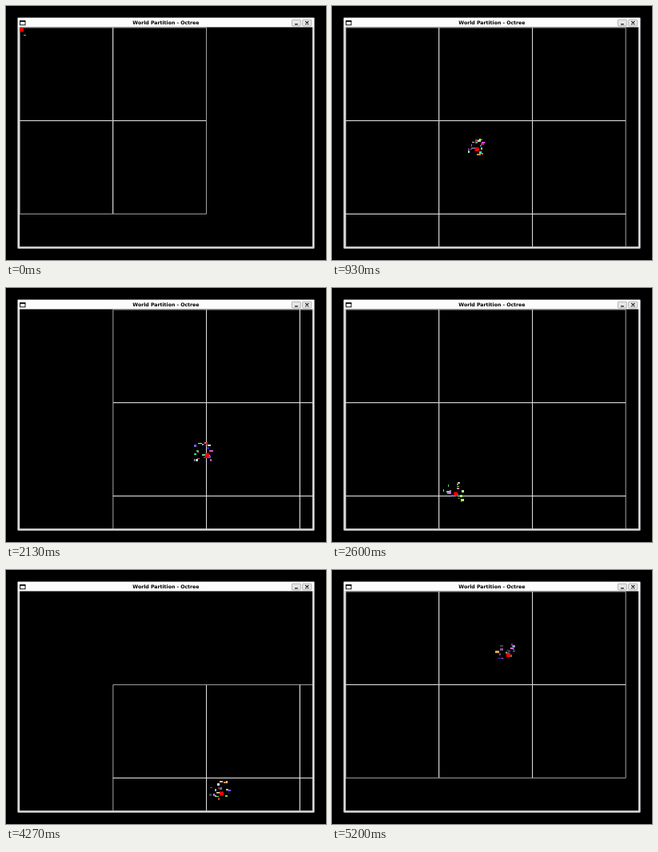
An HTML page with a canvas for the animation above (5.27 s loop, 400 by 318 pixels).

```html
<!DOCTYPE html>
<html lang="en">
<head>
<meta charset="utf-8">
<title>World Partition - Octree</title>
<style>
  html, body { margin: 0; width: 100%; height: 100%; overflow: hidden; background: #000; }
  svg, canvas { position: absolute; left: 0; top: 0; }
  text { font: bold 6.2px "DejaVu Sans", sans-serif; text-anchor: middle; }
</style>
</head>
<body>
<svg width="400" height="318">
  <rect x="14.4" y="14.4" width="371.2" height="289.4" rx="1" fill="#dadada"/>
  <rect x="15" y="15" width="370" height="11.4" fill="#fcfcfc"/>
  <rect x="17.2" y="26.6" width="365.8" height="274.6"/>
  <rect x="17.6" y="18.6" width="6.4" height="5.2" fill="#fff" stroke="#111"/>
  <path d="M17.5 19h6.6" stroke="#000" stroke-width="1.6"/>
  <text x="199.9" y="22.9">World Partition - Octree</text>
  <g fill="#e6e6e6" stroke="#999" stroke-width=".7">
    <rect x="357.3" y="17.2" width="11" height="7.8" rx="1"/>
    <rect x="370.6" y="17.2" width="11.2" height="7.8" rx="1"/>
  </g>
  <path d="M361 22.8h3.8M374.3 19.2l4 4m0-4l-4 4" stroke="#111" stroke-width="1.2"/>
</svg>
<canvas id="stage" width="400" height="318"></canvas>
<script>
const ctx = document.getElementById('stage').getContext('2d');
const LOOP = 5270, STEP = 200 / 3;
const CELL = 116.8, LEFT = 16.9, TOP = 26.8, INSET = 0.2;
const SPARKS = 19, LIFE = 5;

// Turning points of the player: step, x, y
const turns = [
  [0, 19.5, 29.8], [8, 110, 148], [14, 181, 179.5], [25, 348, 160], [40, 141, 265],
  [45, 141, 335], [51, 215, 424], [55, 265, 424], [64, 269.5, 280], [77, 220.5, 106.5]
];

function playerAt(step) {
  const next = turns.findIndex(turn => turn[0] > step);
  if (next < 0) return turns.at(-1).slice(1);
  const [s0, x0, y0] = turns[next - 1], [s1, x1, y1] = turns[next];
  const f = (step - s0) / (s1 - s0);
  return [x0 + (x1 - x0) * f, y0 + (y1 - y0) * f];
}

function random(seed) {
  const v = Math.sin(seed * 12.9898 + 4.1) * 43758.5453;
  return v - Math.floor(v);
}

// Outline the player's cell and its neighbours
function drawCells(x, y) {
  const col = Math.floor((x - LEFT) / CELL), row = Math.floor((y - TOP) / CELL);
  const size = CELL - 2 * INSET;
  ctx.strokeStyle = '#fff';
  ctx.lineWidth = 0.65;
  for (let c = Math.max(0, col - 1); c <= col + 1; c++)
    for (let r = Math.max(0, row - 1); r <= row + 1; r++)
      ctx.strokeRect(LEFT + c * CELL + INSET, TOP + r * CELL + INSET, size, size);
}

// Each spark keeps its place beside the player for LIFE steps
function drawSparks(x, y, step) {
  for (let i = 0; i < SPARKS; i++) {
    let seed = (Math.floor((step + i) / LIFE) * SPARKS + i) * 8;
    const pick = (lo, hi) => Math.round(lo + random(seed++) * (hi - lo));
    const w = pick(1, 5), h = pick(1, 3.4);
    ctx.fillStyle = `rgb(${pick(30, 255)},${pick(30, 255)},${pick(30, 255)})`;
    ctx.fillRect(Math.round(x) + pick(-17, 8), Math.round(y) + pick(-16, 7), w, h);
  }
}

function draw(now) {
  const step = Math.floor((now % LOOP + 4) / STEP) % 79;
  const [x, y] = playerAt(step);
  ctx.clearRect(0, 0, 400, 318);
  ctx.save();
  ctx.beginPath();
  ctx.rect(17.2, 26.6, 365.8, 274.6);
  ctx.clip();
  drawCells(x, y);
  drawSparks(x, y, step);
  ctx.fillStyle = '#f00';
  ctx.fillRect(x - 2.5, y - 2.5, 5, 5);
  ctx.restore();
}

const start = performance.now();
function tick() {
  draw(performance.now() - start);
  requestAnimationFrame(tick);
}
tick();
</script>
</body>
</html>
```
